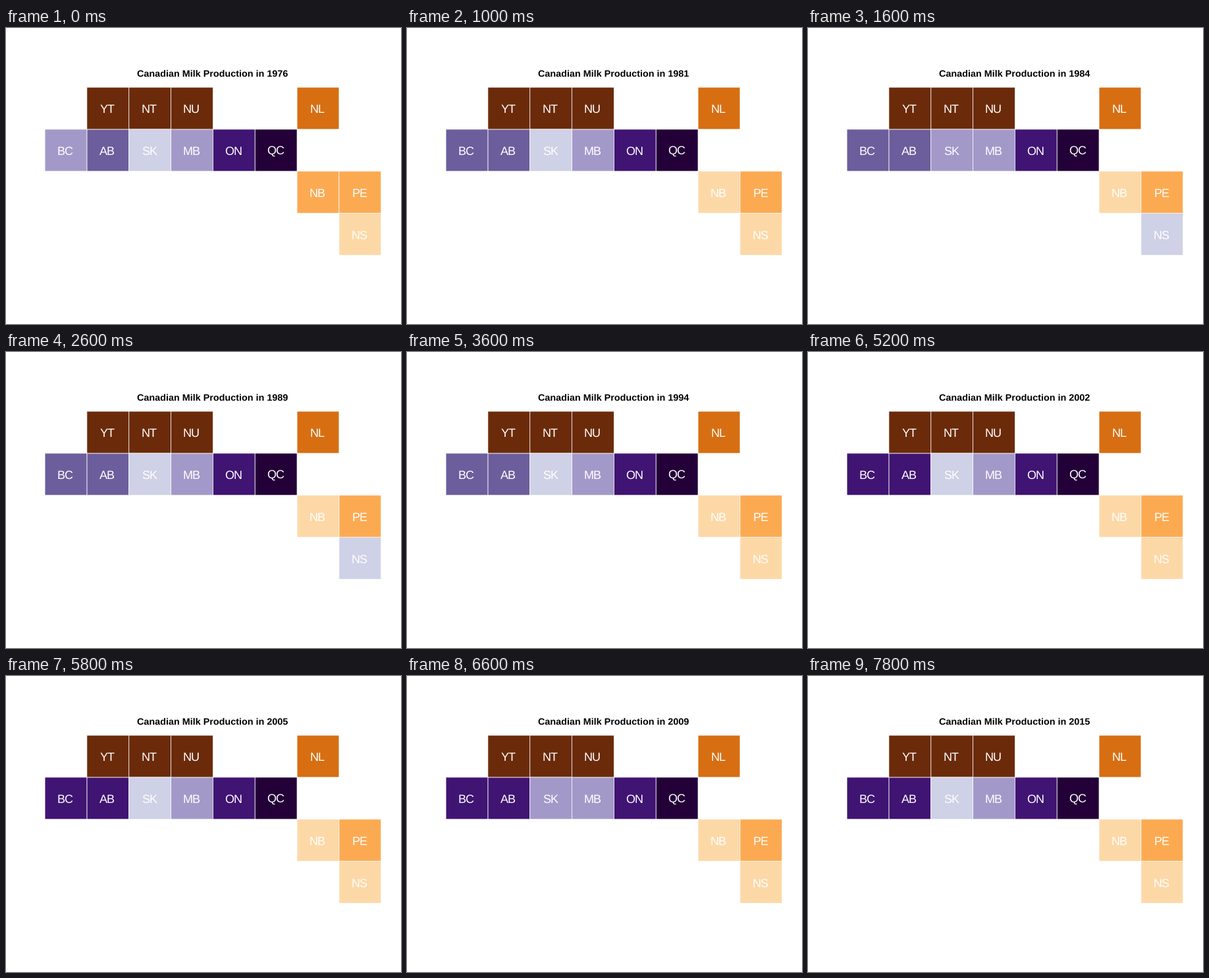
Recreate the animation shown at these times as a matplotlib script. Size 600 by 450 pixels, loop 8000 ms.

```python
import matplotlib.pyplot as plt
from matplotlib.animation import FuncAnimation
from matplotlib.patches import Rectangle

plt.rcParams["font.family"] = "Liberation Sans"
plt.rcParams["text.hinting"] = "none"

W, H, DPI = 600, 450, 100
PX = 72 / DPI                      # one pixel in points
LEFT, TOP, CELL = 59.04, 90.12, 63.84
FIRST, LAST = 1976, 2015

LAYOUT = """
-- YT NT NU -- -- NL --
BC AB SK MB ON QC -- --
-- -- -- -- -- -- NB PE
-- -- -- -- -- -- -- NS
"""

# production classes, lowest first, with their members in the first year
CLASSES = {
    "#6b2b0a": "YT NT NU",
    "#d76e12": "NL",
    "#fcaa52": "NB PE",
    "#fdd8a7": "NS",
    "#cfd1e6": "SK",
    "#a399c9": "BC MB",
    "#6c5e9c": "AB",
    "#401473": "ON",
    "#230037": "QC",
}
COLORS = list(CLASSES)
START = {name: level for level, names in enumerate(CLASSES.values())
         for name in names.split()}

# years in which a region moves one class up or down
UP = {"BC": (1979, 2002), "AB": (1997, 2012), "SK": (1983, 2007),
      "ON": (1997,), "NB": (1979,), "NS": (1978, 1983, 1996, 2011)}
DOWN = {"AB": (2010,), "SK": (1989, 2014), "ON": (2001,),
        "NS": (1981, 1991, 2002, 2014)}


def color_at(name, year):
    ups = sum(y <= year for y in UP.get(name, ()))
    downs = sum(y <= year for y in DOWN.get(name, ()))
    return COLORS[START[name] + ups - downs]


fig = plt.figure(figsize=(W / DPI, H / DPI), dpi=DPI, facecolor="white")
ax = fig.add_axes([0, 0, 1, 1])
ax.set(xlim=(0, W), ylim=(H, 0))
ax.axis("off")

cells = {name: (LEFT + col * CELL, TOP + row * CELL)
         for row, line in enumerate(LAYOUT.split("\n")[1:-1])
         for col, name in enumerate(line.split()) if name != "--"}

# alphabetical order decides which borders lie on top
tiles = {}
for name in sorted(cells):
    x, y = cells[name]
    tiles[name] = ax.add_patch(Rectangle(
        (x, y), CELL, CELL, facecolor=color_at(name, FIRST),
        edgecolor="white", linewidth=0.75 * PX, snap=False))
    lift = "Q" in name                 # the tail of Q raises its label
    ax.text(x + CELL / 2 - 0.8, y + CELL / 2 + 7 - lift, name, color="white",
            fontsize=18 * PX, ha="center", va="baseline")

title = ax.text(199, 74, "", fontsize=14.4 * PX, weight="bold",
                color="black", ha="left", va="baseline")


def update(i):
    year = FIRST + i
    title.set_text(f"Canadian Milk Production in {year}")
    for name, tile in tiles.items():
        tile.set_facecolor(color_at(name, year))
    return [title, *tiles.values()]


anim = FuncAnimation(fig, update, frames=LAST - FIRST + 1, interval=200,
                     repeat=True, repeat_delay=0, blit=False)
plt.show()
```
